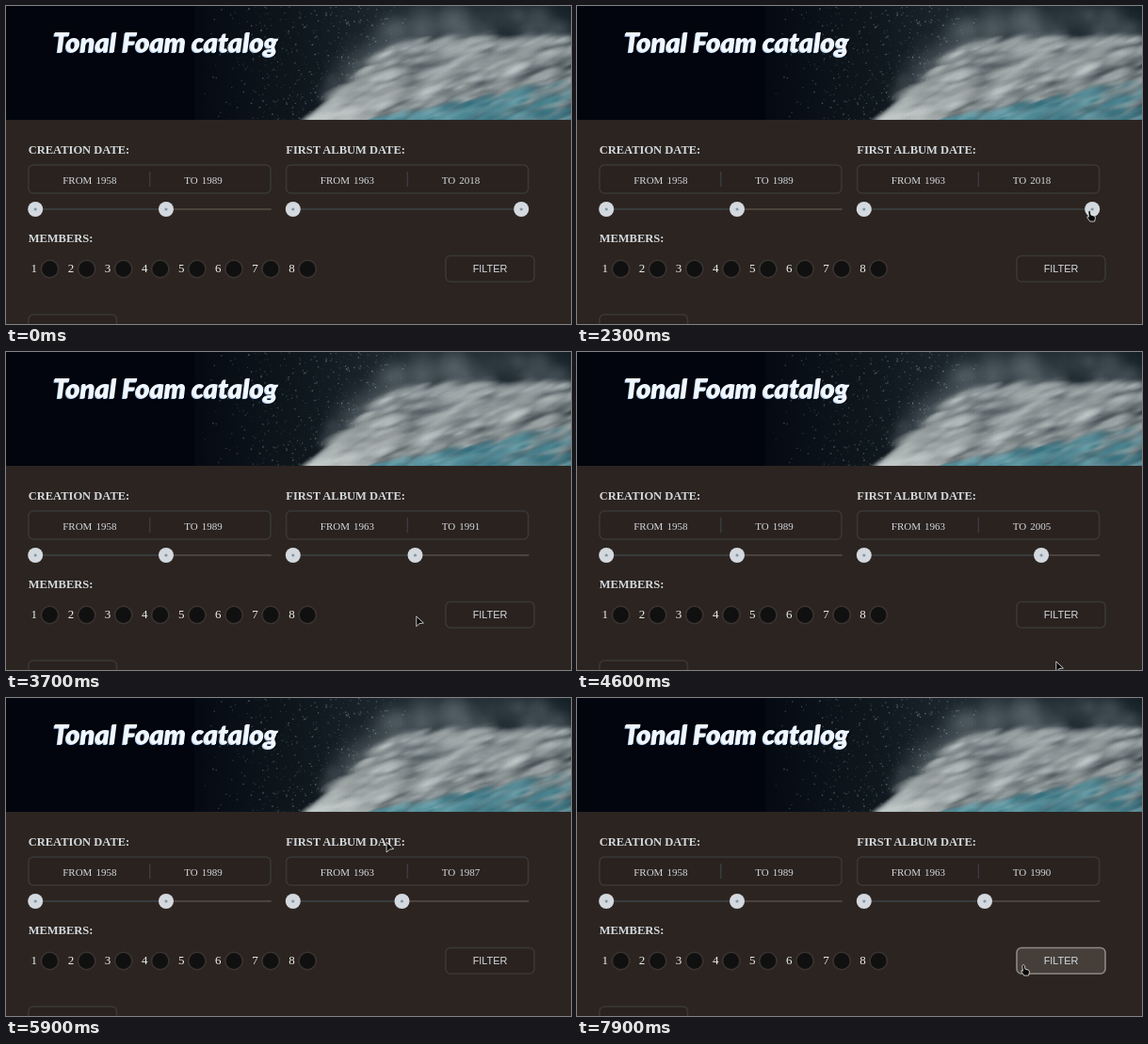
An HTML page with a canvas that plays this animation: 600x338 px, repeating every 8000 ms.

```html
<!DOCTYPE html>
<html lang="en">
<head>
<meta charset="utf-8">
<title>Archive filter</title>
<style>
  html, body { margin: 0; width: 100%; height: 100%; overflow: hidden; background: #2c2420; }
  canvas, svg { position: absolute; left: 0; top: 0; display: block; }
  text { fill: #d3d9de; font: 11px "Liberation Serif", serif; }
  .heading { font-size: 12.5px; font-weight: bold; }
  .count { font-size: 13px; fill: #eceeee; }
  .label { font: 10.9px "Liberation Sans", sans-serif; text-anchor: middle; }
  .title { font: italic 900 29px Lato, sans-serif; fill: #f1f7ff; text-shadow: -1px 1px #b9d3f0, 1px 1px 1px #00040c; }
  .frame { fill: #2a221f; stroke: #383837; stroke-width: 1.6; }
  .hover { fill: #453e39; stroke: #8d8984; }
  .cursor { fill: #050505; stroke: #eee; stroke-width: .8; stroke-linejoin: round; }
</style>
</head>
<body>
<canvas id="photo" width="600" height="121"></canvas>
<svg id="stage" width="600" height="338" viewBox="0 0 600 338"></svg>
<script>
const LOOP = 8000, STEP = 100;
const clamp = (v, lo, hi) => Math.min(hi, Math.max(lo, v));
const lerp = (a, b, k) => a + (b - a) * k;

// Header: soft impression of a breaking wave
function paintPhoto() {
  const ctx = document.getElementById('photo').getContext('2d');
  let seed = 11;
  const rnd = (lo = 0, hi = 1) => lerp(lo, hi, (seed = seed * 16807 % 2147483647) / 2147483647);
  const crest = x => 34 + 85 * clamp((425 - x) / 95, 0, 1) ** 1.3;
  const waterline = x => 122 - (x - 390) * .21;

  const puff = (x, y, r, rgb, alpha, slope = 0) => {
    const g = ctx.createRadialGradient(0, 0, 0, 0, 0, r);
    g.addColorStop(0, `rgba(${rgb},${alpha})`);
    g.addColorStop(1, `rgba(${rgb},0)`);
    ctx.save();
    ctx.translate(x, y);
    ctx.rotate(slope);
    if (slope) ctx.scale(2.2, .6);
    ctx.fillStyle = g;
    ctx.fillRect(-r, -r, 2 * r, 2 * r);
    ctx.restore();
  };

  ctx.fillStyle = '#02050e';
  ctx.fillRect(0, 0, 600, 122);
  const sky = ctx.createLinearGradient(200, 0, 600, 0);
  ['#050a12', '#111a20', '#28333a', '#141e25'].forEach((c, i) => sky.addColorStop(i / 3, c));
  ctx.fillStyle = sky;
  ctx.fillRect(200, 0, 400, 122);

  // Mist
  for (let i = 0; i < 90; i++) {
    const x = rnd(345, 600);
    puff(x, crest(x) + rnd(-24, 16), rnd(10, 26), '118,130,136', .15);
  }
  // Foam, then water below its waterline
  for (let i = 0; i < 900; i++) {
    const x = rnd(325, 610), y = rnd(crest(x), 125), shade = Math.round(rnd(125, 225));
    puff(x, y, rnd(4, 13), `${shade},${shade + 7},${shade + 7}`, .32, -.35);
  }
  for (let i = 0; i < 260; i++) {
    const x = rnd(385, 610), y = rnd(waterline(x), 130), k = rnd();
    const rgb = [lerp(20, 130, k), lerp(85, 185, k), lerp(102, 194, k)].map(Math.round);
    puff(x, y, rnd(4, 11), rgb, .5, -.35);
  }
  // Spray
  for (let i = 0; i < 700; i++) {
    const x = 370 - 170 * rnd() ** 1.5 + rnd(0, 70), y = rnd(0, 122), size = rnd(.5, 1.6);
    if (y > crest(x) + 8) continue;
    ctx.fillStyle = `rgba(150,164,170,${rnd(.1, .5)})`;
    ctx.fillRect(x, y, size, size);
  }
}

// Form
const text = (x, y, cls, str, id = '') => `<text x="${x}" y="${y}" class="${cls}" id="${id}">${str}</text>`;
const frame = (x, y, w, h, id = '') => `<rect class="frame" id="${id}" x="${x}" y="${y}" width="${w}" height="${h}" rx="5"/>`;
const line = (x1, x2, color, id = '') =>
  `<path id="${id}" d="M${x1} 216H${x2}" stroke="${color}" stroke-width="1.6"/>`;
const knob = (x, id = '') => `<g id="${id}" transform="translate(${x} 216)">
  <circle r="8" fill="#d3d9de"/><circle r="1.6" fill="#8496a5"/></g>`;

const range = (x, title, from, to, toX, id) =>
  text(x, 157, 'heading', title) + frame(x + .3, 169, 257, 30) +
  `<path d="M${x + 129} 176v16" stroke="#383c3e" stroke-width="1.5"/>` +
  text(x + 36.5, 189, '', 'FROM') + text(x + 71.7, 189, '', from) +
  text(x + 165.5, 189, '', 'TO') + text(x + 184, 189, '', to, id + 'Year') +
  line(x, x + 258, '#584d47') + line(x, toX, '#31393e', id + 'Fill') +
  knob(x + 7.5) + knob(toX, id + 'Knob');

const member = (_, i) => {
  const x = i * 39.1;
  return text(26.6 + x, 283, 'count', i + 1) +
    `<circle cx="${46.5 + x}" cy="279.5" r="9.2" fill="#101011" stroke="#3a3431" stroke-width="1.6"/>`;
};

const ARROW = 'M.8 0V10.6L4 7.7L8.4 7Z';
const HAND = 'M-1.2 1Q.2-1 1.4 1L1.9 4.6L5 5.5Q6.8 6 6.4 8L5.6 11.5H.8L-2.2 7.4Q-2.6 5.6-.9 6.4L-.5 6.8Z';

document.getElementById('stage').innerHTML =
  text(50, 49, 'title', 'Tonal Foam catalog') +
  range(23.7, 'CREATION DATE:', 1958, 1989, 170, 'creation') +
  range(297.3, 'FIRST ALBUM DATE:', 1963, 2018, 547, 'album') +
  text(23.7, 251, 'heading', 'MEMBERS:') +
  Array.from({ length: 8 }, member).join('') +
  frame(467, 265.5, 94, 27.5, 'filter') + text(514, 283, 'label', 'FILTER') +
  frame(24, 328, 93.5, 27.5) + text(71, 345.7, 'label', 'RESET') +
  '<path id="cursor" class="cursor"/>';

// Pointer key points: time, x, y
const ENTER = 1200, GRAB = 2900, RELEASE = 7000, LEAVE = 7700, ARRIVE = 7900;
const KEYS = [
  [ENTER, 592, 105], [1600, 100, 60], [2100, 544, 217.5], [GRAB, 544, 217.5],
  [3300, 305, 110], [3600, 430, 276], [3700, 435, 281],
  [4000, 588, 170], [4300, 60, 180], [4600, 508, 329],
  [4800, 561, 225], [5300, 254, 80.5], [5500, 235, 220],
  [5800, 575, 180], [6100, 60, 100], [6400, 433, 235], [6500, 433, 176],
  [RELEASE, 433, 216], [LEAVE, 436, 220], [ARRIVE, 474, 283.5]
];

function pointer(t) {
  const next = KEYS.findIndex(key => key[0] >= t);
  if (next < 1) return KEYS.at(next).slice(1);
  const [t0, x0, y0] = KEYS[next - 1], [t1, x1, y1] = KEYS[next];
  const k = (t - t0) / (t1 - t0);
  return [lerp(x0, x1, k), lerp(y0, y1, k)];
}

const el = Object.fromEntries(['albumYear', 'albumFill', 'albumKnob', 'filter', 'cursor']
  .map(id => [id, document.getElementById(id)]));
const MIN_X = 320.5, MAX_X = 547.2, FIRST = 1963, LAST = 2018, LAG = 10;

function render(t) {
  const [x, y] = pointer(t);
  const dragX = pointer(clamp(t - LAG, GRAB, RELEASE))[0];
  const knobX = t <= GRAB ? MAX_X : clamp(dragX, MIN_X, MAX_X);
  el.albumKnob.setAttribute('transform', `translate(${knobX} 216)`);
  el.albumFill.setAttribute('d', `M297.3 216H${knobX}`);
  el.albumYear.textContent = Math.round(lerp(FIRST, LAST, (knobX - MIN_X) / (MAX_X - MIN_X)));

  const overFilter = t >= ARRIVE;
  const overKnob = t >= 2100 && t <= GRAB || t > RELEASE && t <= LEAVE;
  el.filter.classList.toggle('hover', overFilter);
  el.cursor.setAttribute('d', overKnob || overFilter ? HAND : ARROW);
  el.cursor.setAttribute('transform', `translate(${x} ${y})`);
  el.cursor.setAttribute('visibility', t < ENTER ? 'hidden' : 'visible');
}

const start = performance.now();
function tick() {
  const t = (performance.now() - start) % LOOP;
  render(Math.floor(t / STEP) * STEP);
  requestAnimationFrame(tick);
}
paintPhoto();
tick();
</script>
</body>
</html>
```
